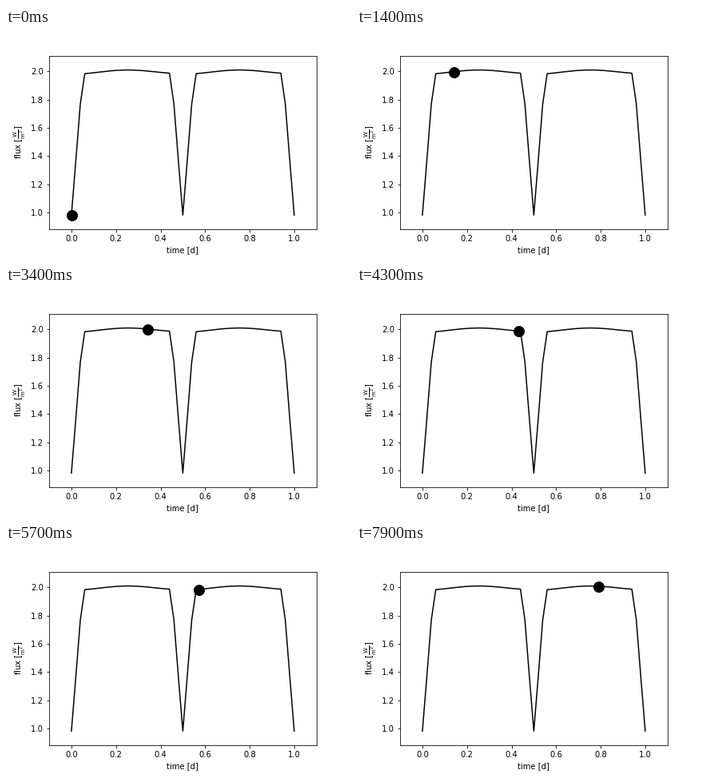
A matplotlib script that plays this animation: 432x288 px, repeating every 8000 ms.

```python
import numpy as np
import matplotlib.pyplot as plt
from matplotlib.animation import FuncAnimation
from matplotlib.markers import MarkerStyle
from matplotlib.transforms import Affine2D

FRAMES, INTERVAL = 80, 100
HALF = 0.5          # the light curve repeats every half orbit
DOT = 13


def hump(phase):
    """Brightness outside the eclipses."""
    u = phase - 0.25
    return 2.01 - 0.01388 * (1 - np.cos(4 * np.pi * u)) + 0.009 * u


def flux(t):
    phase = np.round(np.mod(t, HALF), 6)
    dist = np.minimum(phase, HALF - phase)
    edge = np.where(phase < HALF / 2, hump(0.06), hump(0.44))
    ingress = np.interp(dist, [0, 0.02, 0.04], [0.983, 1.37, 1.77])
    egress = 1.77 + (edge - 1.77) * (dist - 0.04) / 0.02
    return np.where(dist <= 0.04, ingress,
                    np.where(dist < 0.06, egress, hump(phase)))


plt.rcParams.update({"font.family": "DejaVu Sans", "font.size": 10})
fig = plt.figure(figsize=(6, 4), dpi=72, facecolor="white")
fig.subplots_adjust(left=0.125, right=0.9, bottom=0.125, top=0.88)
ax = fig.add_subplot()

time = np.linspace(0, 1, 51)
ax.plot(time, flux(time), color="black", lw=1.5)

# Centre the dot on the middle of a pixel.
nudge = Affine2D().translate(0.5 / DOT, -0.5 / DOT)
dot, = ax.plot([0], [float(flux(0))], ls="none", ms=DOT, mew=1, color="black",
               marker=MarkerStyle("o", transform=nudge))

ax.set_xlim(-0.1, 1.1)
ax.set_ylim(0.8825, 2.112)
ax.set_xticks(np.arange(0, 1.01, 0.2))
ax.set_yticks(np.arange(1, 2.01, 0.2))
ax.set_xlabel("time [d]")
ax.set_ylabel(r"flux [$\frac{\mathrm{W}}{\mathrm{m}^2}$]")


def update(i):
    t = i / 100
    dot.set_data([t], [float(flux(t))])
    return dot,


anim = FuncAnimation(fig, update, frames=FRAMES, interval=INTERVAL,
                     repeat=True, repeat_delay=0)
plt.show()
```
